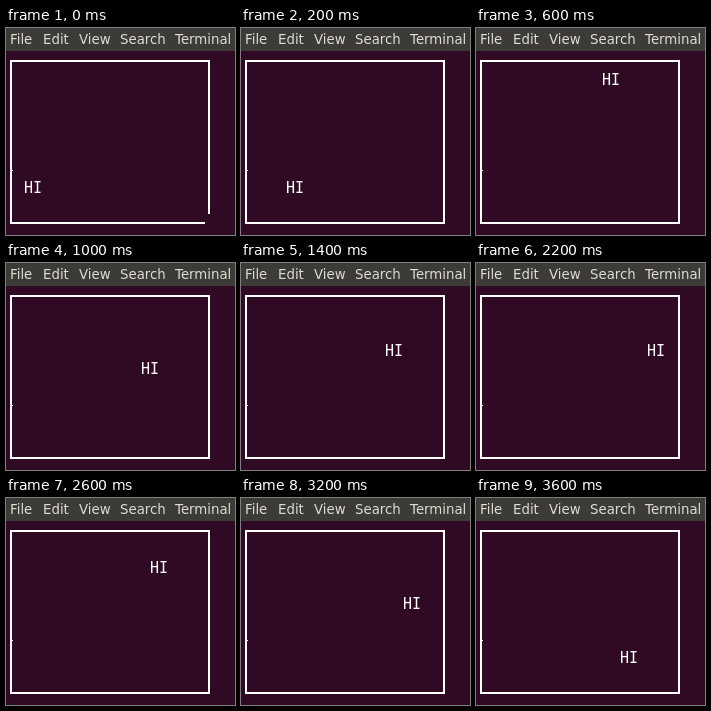
Recreate the animation shown at these times as an HTML page. Size 229 px wide and 207 px high, loop 3800 ms.

```html
<!DOCTYPE html>
<html lang="en">
<head>
<meta charset="utf-8">
<title>Terminal</title>
<style>
  html, body { margin: 0; width: 100%; height: 100%; overflow: hidden; background: #300a24; }
  svg { display: block; width: 100vw; height: 100vh; }
  text { white-space: pre; }
  .menu { font: 13.33px "DejaVu Sans", sans-serif; fill: #dfdbd2; }
  .word { font: 15px "DejaVu Sans Mono", monospace; fill: #fff; }
</style>
</head>
<body>
<svg viewBox="0 0 229 207">
  <rect width="229" height="207" fill="#300a24"/>
  <rect width="229" height="23" fill="#3c3b37"/>
  <g class="menu">
    <text x="4" y="16">File</text>
    <text x="37" y="16">Edit</text>
    <text x="73" y="16">View</text>
    <text x="114" y="16">Search</text>
    <text x="169" y="16">Terminal</text>
  </g>
  <path id="box" fill="none" stroke="#fff" stroke-width="2"/>
  <rect x="6" y="142" width="1" height="1" fill="#fff"/>
  <text id="word" class="word">HI</text>
</svg>
<script>
  const STEP = 200, CELL_W = 9, CELL_H = 18;
  // Column and row of the word at each step
  const spots = [
    [2, 7], [5, 7], [5, 8], [14, 1], [2, 6], [15, 4], [2, 5], [16, 3], [1, 6], [15, 1],
    [17, 3], [19, 3], [18, 7], [16, 2], [13, 2], [19, 4], [18, 4], [16, 1], [16, 7]
  ];
  const OPEN = "M199 195H5V33H203V186";
  const CLOSED = "M5 33H203V195H5Z";
  const word = document.getElementById("word");
  const box = document.getElementById("box");

  function draw(now) {
    const step = Math.floor(now / STEP) % spots.length;
    const [col, row] = spots[step];
    word.setAttribute("x", col * CELL_W);
    word.setAttribute("y", row * CELL_H + 39);
    box.setAttribute("d", step === 0 ? OPEN : CLOSED);
  }

  const start = performance.now();
  function tick() {
    draw(performance.now() - start);
    requestAnimationFrame(tick);
  }
  tick();
</script>
</body>
</html>
```
